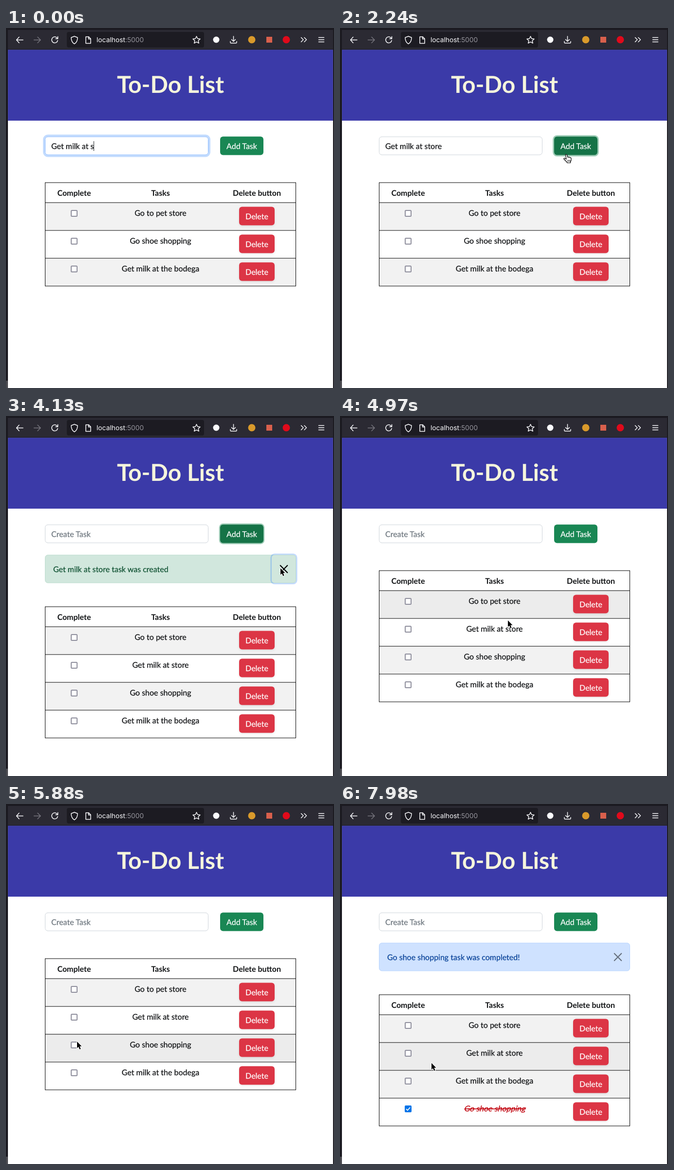
Write an HTML page that moves like this. It is 674x738 px and loops after 8000 ms.

```html
<!DOCTYPE html>
<html lang="en">
<head>
<meta charset="utf-8">
<title>To-Do List</title>
<style>
  html, body { margin: 0; width: 100%; height: 100%; overflow: hidden; background: #fff; }
  svg { display: block; width: 674px; height: 738px; font: 16px Lato, sans-serif; text-rendering: geometricPrecision; }
  text { color: #111315; fill: currentColor; stroke: currentColor; stroke-width: .25px; white-space: pre; }
  .mid { text-anchor: middle; }
  .bold { font-weight: 700; stroke: none; }
  .on { color: #fff; }
  .url { font: 13.8px Inter, sans-serif; color: #fbfbfe; stroke: none; }
  .icons { fill: none; stroke: #fbfbfe; stroke-width: 1.5; stroke-linecap: round; stroke-linejoin: round; }
  .done { color: #c0000c; text-decoration: line-through; }
  .raised { filter: drop-shadow(0 2px 2px #00000016); }
</style>
</head>
<body>
<svg viewBox="0 0 674 738">
  <rect width="674" height="738" fill="#1b1a20"/>
  <rect x="4" y="4" width="668" height="734" fill="#2b2a33"/>
  <rect x="4" y="43.500" width="668" height="1" fill="#17161c"/>
  <rect y="723" width="4" height="15" fill="#4a4a50"/>
  <rect x="125" y="8" width="282" height="32" rx="4" fill="#1c1b22"/>
  <g class="icons">
    <path d="M35 24.500H21.500M27 18.500L21.500 24.500L27 30.500"/>
    <path d="M57.500 24.500H71M65 18.500L71 24.500L65 30.500" stroke="#77767e"/>
    <path d="M105 20.500A6.200 6.200 0 1 0 106.200 25.500M106.500 17.500V22H102"/>
    <path d="M140.500 17L147 19.500C147 26 145 30 140.500 32.500C136 30 134 26 134 19.500Z"/>
    <path d="M164 18H170L174 22V31.500H164ZM169.500 18V22.500H174"/>
    <path d="M391.500 17L393.700 21.800L399 22.400L395.100 26L396.200 31.200L391.500 28.600L386.800 31.200L387.900 26L384 22.400L389.300 21.800Z"/>
    <path d="M467.500 17V27M463.500 23.500L467.500 27.500L471.500 23.500M461 27.500V29.500Q461 31 462.500 31H472.500Q474 31 474 29.500V27.500"/>
    <path d="M606.500 19.500L611 24L606.500 28.500M613 19.500L617.500 24L613 28.500"/>
    <path d="M642.500 19.500H653.500M642.500 24H653.500M642.500 28.500H653.500"/>
  </g>
  <circle cx="432" cy="24" r="6.500" fill="#fbfbfe"/>
  <circle cx="505" cy="24" r="7.500" fill="#d99a2b"/>
  <rect x="535" y="18" width="12" height="12" fill="#d9604c"/>
  <circle cx="576" cy="24" r="7.500" fill="#e00a1b"/>
  <text x="186" y="29.300" class="url">localhost<tspan fill="#96959d">:5000</tspan></text>
  <rect x="4" y="189" width="668" height="549" fill="#fff"/>
  <rect x="4.500" y="45" width="667" height="144.500" fill="#3b3aa8" stroke="#4a48b2"/>
  <text class="mid bold" x="338" y="132.500" style="font-size:48px;color:#f5f5dc">To-Do List</text>
  <g id="page"></g>
</svg>
<script>
const page = document.getElementById('page');
const LOOP = 8000, STEP = 70;
const CLICK = 2100, ADDED = 2310, CLOSED = 4270, COMPLETED = 6510;
const PET = 'Go to pet store', SHOE = 'Go shoe shopping', STORE = 'Get milk at store', BODEGA = 'Get milk at the bodega';

// Pointer way-points: time, x, y
const path = [
  [1400, 430, 479], [1750, 452, 360], [2030, 465, 270], [2170, 465, 259], [2730, 465, 259],
  [3290, 514.5, 299.5], [3570, 541, 309], [3850, 564, 312], [4550, 564, 312],
  [4760, 455, 365], [4970, 345, 419], [5390, 225, 456], [5880, 146, 487],
  [6020, 138, 502], [6160, 138, 491], [7420, 138, 491], [7700, 160, 512], [7980, 188, 531]
];

const ramp = (t, a, b) => Math.min(1, Math.max(0, (t - a) / (b - a)));

function pointer(t) {
  if (t < path[0][0]) return null;
  const i = Math.max(1, path.findIndex(p => p[0] >= t));
  const [a, x, y] = path[i - 1], [b, u, v] = path[i];
  const k = ramp(t, a, b);
  return { x: x + (u - x) * k, y: y + (v - y) * k };
}

const rect = (x, y, w, h, fill, extra = '') =>
  `<rect x="${x}" y="${y}" width="${w}" height="${h}" fill="${fill}" ${extra}/>`;
const outlined = (x, y, w, h, fill, stroke) =>
  rect(x + .5, y + .5, w - 1, h - 1, fill, `rx="5.5" stroke="${stroke}"`);
const ring = (x, y, w, h, size, color) => size <= 0 ? '' :
  rect(x - size / 2, y - size / 2, w + size, h + size, 'none', `rx="${6 + size / 2}" stroke="${color}" stroke-width="${size}"`);
const text = (x, y, s, attrs = '') => `<text x="${x}" y="${y}" ${attrs}>${s}</text>`;
const button = (x, y, w, label, fill, cls = '') =>
  rect(x, y, w, 38, fill, `rx="6" class="${cls}"`) + text(x + w / 2, y + 25.5, label, 'class="mid on"');

function form(t) {
  const focused = t < CLICK, pressed = t >= 2030 && t < CLOSED, y = 222.5;
  const typed = STORE.slice(0, 13 + [70, 210, 350, 420].filter(at => t >= at).length);
  const empty = t >= ADDED;
  const halo = 4 * Math.min(ramp(t, CLICK, 2300), 1 - ramp(t, 4060, 4220));
  return (focused ? ring(80, y, 336, 38, 4, '#c2dbfe') : '') +
    outlined(80, y, 336, 38, '#fff', focused ? '#86b7fe' : '#ced4da') +
    text(93, y + 25.5, empty ? 'Create Task' : typed, empty ? 'style="color:#6c757d"' : 'id="typed"') +
    ring(440, y, 89, 38, halo, '#9dccb6') +
    button(440, y, 89, 'Add Task', pressed ? '#157347' : '#198754');
}

function notice(t) {
  const done = t >= COMPLETED, y = 284.5;
  const [bg, edge, ink, msg] = done
    ? ['#cfe2ff', '#b6d4fe', '#084298', SHOE + ' task was completed!']
    : ['#d1e7dd', '#badbcc', '#0f5132', STORE + ' task was created'];
  const dark = done ? .5 : t >= 4060 ? 1 : t >= 3780 ? .75 : .5;
  const fade = done ? 1 : 1 - ramp(t, 4130, CLOSED);
  const halo = done ? 0 : 4 * ramp(t, 4040, 4180);
  return `<g opacity="${fade}">` + outlined(80, y, 516, 58, bg, edge) +
    text(97, y + 35.5, msg, `style="color:${ink}"`) +
    ring(546, y, 50, 58, halo, '#0d6efd40') +
    `<path d="M563.8 306.500L578.200 321M578.200 306.500L563.800 321" stroke="#000" stroke-width="2.200" stroke-linecap="round" opacity="${dark}"/></g>`;
}

function checkbox(y, on) {
  return on
    ? rect(133, y, 14, 14, '#0074e8', 'rx="2"') +
      `<path d="M136 ${y + 7.2}l2.800 2.800l5.200 -6" fill="none" stroke="#fff" stroke-width="1.800"/>`
    : rect(134, y + 1, 12, 12, '#fff', 'rx="1.500" stroke="#8f8f9d" stroke-width="2"');
}

function table(t, top) {
  const tasks = t < ADDED ? [PET, SHOE, BODEGA] : t < COMPLETED ? [PET, STORE, SHOE, BODEGA] : [PET, STORE, BODEGA, SHOE];
  const at = pointer(t - STEP);
  const hovered = at && at.x > 80 && at.x < 596 ? Math.floor((at.y - top - 41) / 57) : -1;
  const head = (x, s) => text(x, top + 27.5, s, 'class="mid bold"');
  let out = head(140, 'Complete') + head(317.5, 'Tasks') + head(515.5, 'Delete button');
  tasks.forEach((task, i) => {
    const y = top + 41 + i * 57, done = t >= COMPLETED && task === SHOE;
    const slant = `transform="translate(317.5 ${y + 27.5}) skewX(${done ? -14 : 0})"`;
    out += rect(80, y, 516, 57, i === hovered ? '#ececec' : i % 2 ? '#fff' : '#f2f2f2') +
      rect(80, y, 516, 1, '#000') + checkbox(y + 15.5, done) +
      text(0, 0, task, `class="mid${done ? ' done' : ''}" ${slant}`) +
      button(479, y + 9, 73, 'Delete', '#dc3545', 'raised');
  });
  return out + rect(80.5, top + .5, 515, 41 + tasks.length * 57, 'none', 'stroke="#000"');
}

function cursor(t) {
  const p = pointer(t);
  if (!p) return '';
  const hand = t >= 2030 && t < 2870;
  const shape = hand
    ? '<path d="M-1.500 1.500Q-2 0 -.5 0Q1 0 1.500 1.500L3 6Q4.500 4.800 5.500 6.300Q7 5.200 8 6.800Q9.800 6.200 10 8.500V12Q9.500 14 8.500 15V17.500H1.500V16Q-2 13 -5 9.500Q-5.500 7.500 -3.500 7.800L0 10Z" fill="#fff" stroke="#000" stroke-width="1.200" stroke-linejoin="round"/><path d="M3 11.500V15M5.200 11.500V15M7.400 11.500V15" stroke="#000" stroke-width=".9"/>'
    : '<path d="M0 0V13.500L3 10.700L5.300 16L7.600 15L5.400 9.800H9.500Z" fill="#000" stroke="#fff" stroke-width="2" stroke-linejoin="round" paint-order="stroke"/>';
  return `<g transform="translate(${p.x} ${p.y})">${shape}</g>`;
}

function caret(t) {
  if ((t >= 630 && t < 1260) || t >= 1820) return '';
  const x = 93 + Math.round(document.getElementById('typed').getComputedTextLength());
  return rect(x, 232, 1, 20, '#212529');
}

function draw(now) {
  const t = Math.floor(now % LOOP / STEP) * STEP;
  const alert = (t >= ADDED && t < CLOSED) || t >= COMPLETED;
  page.innerHTML = form(t) + (alert ? notice(t) : '') + table(t, alert ? 390.5 : 316.5) + cursor(t);
  page.insertAdjacentHTML('beforeend', caret(t));
}

const start = performance.now();
function tick() {
  draw(performance.now() - start);
  requestAnimationFrame(tick);
}
tick();
</script>
</body>
</html>
```
